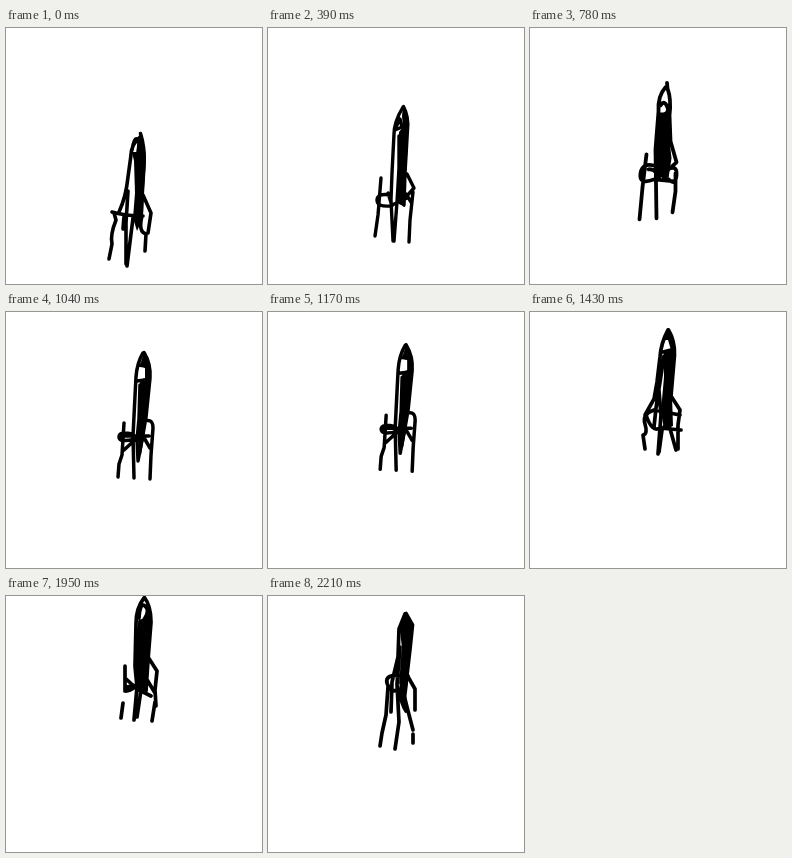
An HTML page with a canvas for the animation above (2.34 s loop, 256 by 256 pixels).

```html
<!DOCTYPE html>
<html lang="en">
<head>
<meta charset="utf-8">
<title>Rocket doodle</title>
<style>
html, body { margin: 0; width: 100%; height: 100%; overflow: hidden; background: #fff; }
canvas { display: block; width: 256px; height: 256px; }
</style>
</head>
<body>
<canvas id="stage" width="256" height="256"></canvas>
<script>
const STEP = 130, COUNT = 18;
const ctx = document.getElementById("stage").getContext("2d");

// Each pose: the drawing step it belongs to, its nose, solid ink and pen lines.
const poses = [
  {
    at: 0, nose: [134.5, 105], width: 3.6,
    ink: "M134 108Q140 118 140 132L138 160L137 190L131 203L127 190L129 165L128 133L126 124L133 124Z",
    pen: "M134.5 105.5Q139 119 138 137L136 170L135 190M134 109Q125 117 125 127L122 149Q120 169 113 184" +
      "M126 122Q128 110 131 111T132 124M122 163L120 195L120 236M127 190L125 206L121 238" +
      "M106 184Q120 188 137 188M108 185L110 192Q104 207 106 216L103 231M118 188L117 201" +
      "M137 167L145 185L142 205M136 188Q132 204 140 206L139 223"
  },
  {
    at: 3, nose: [135.5, 77], width: 3.4,
    ink: "M135 78L140 92L140 115L138 145L137 179L131 176L129 160L131 133L131 104L135 99L134 88Z",
    pen: "M135.5 78.5Q141 89 139.5 102L137 145L136 177M135 79Q126 94 126 106L124 145L123 172L125 213" +
      "M127 101L132 91L134 99L127 102M131 108L131 140L129 174L126 213" +
      "M113 150L110 187L107 208M122 167Q109 165 109 172T122 178L139 170" +
      "M139 146L146 160L138 169M120 165L124 178M138 166L143 174M145 164L142 192L141 214"
  },
  {
    at: 5, nose: [136.5, 61], width: 3.8,
    ink: "M135 90L139 83L139 119L141 137L138 157L129 153L129 110L131 94Z",
    pen: "M136.5 61.5L137 67Q141 78 139 94L140 120L146 141L137 149M135 66Q127 75 128 90L125 128L126 197" +
      "M130 84Q134 78 137 86T130 93M130 94L128 151L137 159" +
      "M116 133L112 166L109 198M126 145Q112 140 110 152T124 158L144 160" +
      "M118 148Q126 147 129 158M137 148Q147 143 146 154T138 158M145 152L145 170L142 191"
  },
  {
    at: 8, nose: [138, 41], width: 3.5,
    ink: "M138 41L144 54L144 66L142 84L140 109L138 126L135 143L132 128L134 105L134 68L139 66L139 56L134 53Z",
    pen: "M138 40.5Q145 52 144 66L140 105L136 128L132 149M137 41Q131 51 130 65L129 84L127 124L128 166" +
      "M133 53L139 54M131 69L139 68M134 73L133 107L131 128L132 148" +
      "M118 111L116 143L113 152L112 165M126 122Q113 119 113 125T129 127M118 138L132 125L137 110" +
      "M114 124L143 124M136 110Q147 105 147 116L145 143L144 167M137 124L144 136"
  },
  {
    at: 11, nose: [138.5, 18], width: 3.7,
    ink: "M138 18L144 32L145 44L142 84L143 114L134 117L131 99L134 65L134 41L141 38L138 28L135 28Z",
    pen: "M138.5 18Q145 29 144.5 43L141 84L150 98L148 113L148 137M138 18Q131 31 130 45L127 70L124 87L115 103" +
      "M133 40L141 38M128 67L131 103L128 142M134 44L126 96L124 115" +
      "M124 98Q112 102 115 112T113 123L115 137M116 103Q122 121 130 116L151 118" +
      "M129 99L150 103M136 112L132 118L129 140M139 113L146 138"
  },
  {
    at: 15, nose: [138.5, 1], width: 3.7,
    ink: "M134 24L144 18L145 31L143 65L141 95L135 94L133 65Z",
    pen: "M138.5 1.5Q145 10 145 26L142 64L140 95M138 2Q130 12 130 28L129 70L131 91L128 124" +
      "M133 22Q134 6 139 10T139 22M134 25L132 64L135 94L131 121" +
      "M119 70L119 94M117 107L115 122M119 82L131 93L145 100M119 95Q126 96 137 82" +
      "M121 91Q132 87 137 94M142 61L151 75L149 94L150 110M140 82L149 97M149 106L146 125"
  },
  {
    at: 17, nose: [138, 17], width: 3.7,
    ink: "M138 17L145 29L142 52L140 88L138 104L133 89L134 53L132 33Z",
    pen: "M138 17.5L144.5 29L142 53L139 79L147 93L147 114M137 18L131 33L130 61L124 86L123 116" +
      "M134 36L138 30L135 61L133 87L139 111L145 134M132 51L129 88L131 126L127 153" +
      "M132 80Q117 78 119 87T132 95L140 80M120 91L118 119L114 137L112 150" +
      "M136 83Q128 98 138 115M145 138L145 147"
  }
].map(p => ({ ...p, ink: new Path2D(p.ink), pen: new Path2D(p.pen) }));

// Nose position at a drawing step, between the neighbouring poses.
function noseAt(step) {
  const i = Math.max(1, poses.findIndex(p => p.at >= step));
  const a = poses[i - 1], b = poses[i];
  let k = (step - a.at) / (b.at - a.at);
  if (a.at === 11) k = Math.sin(k * Math.PI / 2);
  return a.nose.map((v, j) => v + (b.nose[j] - v) * k);
}

function nearest(step) {
  return poses.reduce((a, b) =>
    Math.abs(b.at - step) < Math.abs(a.at - step) ? b : a);
}

function draw(step) {
  const pose = nearest(step), nose = noseAt(step);
  ctx.fillStyle = "#fff";
  ctx.fillRect(0, 0, 256, 256);
  ctx.save();
  ctx.translate(nose[0] - pose.nose[0], nose[1] - pose.nose[1]);
  ctx.fillStyle = ctx.strokeStyle = "#000";
  ctx.lineCap = ctx.lineJoin = "round";
  ctx.lineWidth = pose.width;
  ctx.fill(pose.ink);
  ctx.stroke(pose.pen);
  ctx.restore();
}

const start = performance.now();
function tick() {
  const time = Math.max(0, performance.now() - start);
  draw(Math.floor(time / STEP) % COUNT);
  requestAnimationFrame(tick);
}
tick();
</script>
</body>
</html>
```
